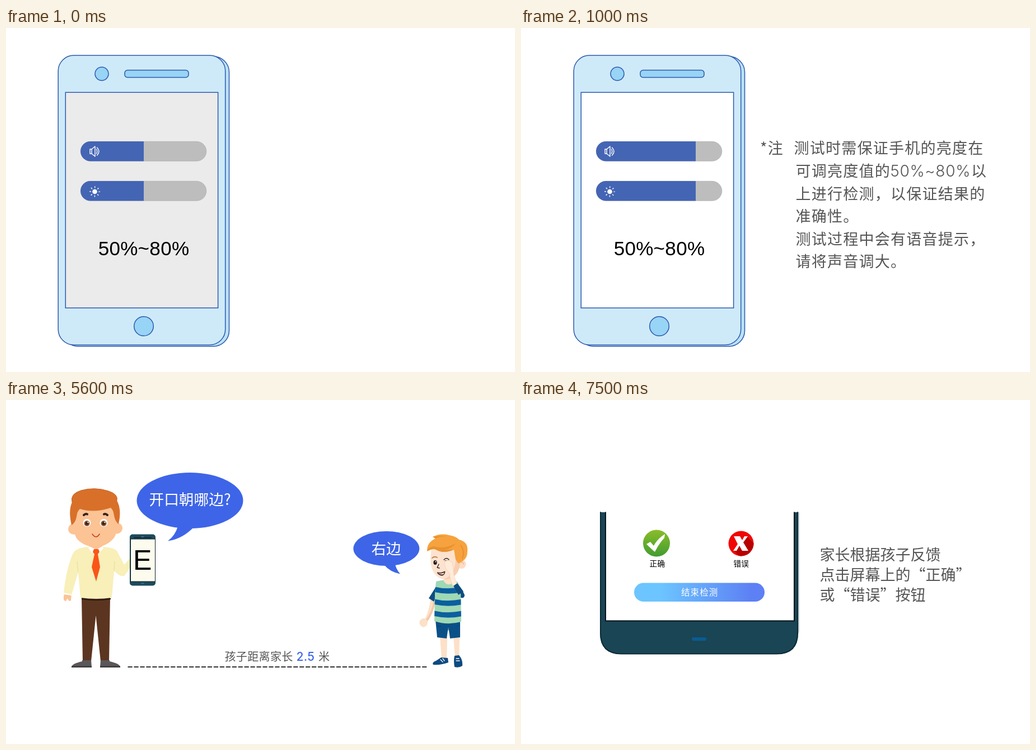
Write an HTML page that moves like this. It is 909 by 616 pixels and loops after 9600 ms.

```html
<!DOCTYPE html>
<html lang="zh-CN">
<head>
<meta charset="utf-8">
<title>视力检测说明</title>
<style>
  html, body { margin: 0; width: 100%; height: 100%; overflow: hidden; background: #fff; }
  svg { display: block; width: 100%; height: 100%; }
  text { font: 300 27px "Noto Sans CJK SC", "Noto Sans CJK", sans-serif; fill: #555; white-space: pre; }
  .latin { font-family: "Liberation Sans", Arial, sans-serif; font-weight: 400; fill: #000; }
  .note text { letter-spacing: 1.25px; }
  .note .digits { font: 300 28px Inter, sans-serif; letter-spacing: .7px; }
  .title text { font-size: 35px; letter-spacing: .5px; }
  .small text, text.small { font-size: 20px; letter-spacing: .35px; }
  .small .distance { font: 500 21px Inter, sans-serif; fill: #3e65e8; }
  .answer { font-size: 13.7px; font-weight: 500; fill: #000; }
  text.white { fill: #fff; }
  .outline { stroke: #2d58ae; stroke-width: 1.5; }
  .line { fill: none; stroke-linecap: round; stroke-linejoin: round; }
</style>
</head>
<body>
<svg viewBox="0 0 909 616">
  <defs>
    <linearGradient id="green" x2="0" y2="1"><stop stop-color="#8abd28"/><stop offset="1" stop-color="#429c32"/></linearGradient>
    <linearGradient id="button"><stop offset=".2" stop-color="#6cc5ff"/><stop offset=".9" stop-color="#5d80f4"/></linearGradient>
    <clipPath id="shirt"><path d="M768 325Q788 319 807 326L812 340L813 397Q789 404 765 396L766 345Z"/></clipPath>
    <clipPath id="red"><circle cx="393" cy="257" r="22.5"/></clipPath>
  </defs>

  <!-- Brightness and volume -->
  <g data-on="0 2500">
    <g id="device">
      <g class="outline">
        <rect x="101" y="51" width="297.5" height="519" rx="28" fill="#b9e2f7"/>
        <rect x="93.2" y="49" width="298.5" height="518.5" rx="28" fill="#ceeaf9"/>
        <rect id="screen" x="106.3" y="115.3" width="272.3" height="386"/>
        <g fill="#97d4f5">
          <circle cx="171" cy="82" r="12"/>
          <rect x="212" y="75.5" width="114" height="13" rx="5"/>
          <circle cx="246" cy="534" r="17.3"/>
        </g>
      </g>
      <g fill="#bdbdbd" stroke="#adadad" stroke-width=".7">
        <rect x="133.3" y="203.3" width="224.5" height="35" rx="17.5"/>
        <rect x="133.3" y="274.3" width="224.5" height="35" rx="17.5"/>
      </g>
      <g fill="#4465b4">
        <path class="level" transform="translate(133 203)"/>
        <path class="level" transform="translate(133 274)"/>
      </g>
      <text class="latin" x="246" y="407" text-anchor="middle" style="font-size:35px;letter-spacing:.3px">50%~80%</text>
    </g>
    <g class="line" stroke="#fff" stroke-width="1.4">
      <path d="M150 217H153L159 212V230L153 225H150ZM153 217V225M161.500 217Q164 221 161.500 225M162.500 214Q169.500 221 162.500 228"/>
      <circle cx="158.500" cy="293" r="3.6" fill="#fff"/>
      <circle cx="158.500" cy="293" r="8" stroke-width="3" stroke-linecap="butt" stroke-dasharray="1.4 4.883" stroke-dashoffset=".7"/>
    </g>
  </g>
  <g class="note" data-on="200 2500">
    <text x="427" y="225">*注</text>
    <text x="487.5" y="225">测试时需保证手机的亮度在</text>
    <text x="490.5" y="266">可调亮度值的</text>
    <text class="digits" x="659.5" y="266">50%~80%</text>
    <text x="804" y="266">以</text>
    <text x="490.5" y="306.500">上进行检测，以保证结果的</text>
    <text x="490.5" y="346.500">准确性。</text>
    <text x="490.5" y="387.500">测试过程中会有语音提示，</text>
    <text x="490.5" y="428">请将声音调大。</text>
  </g>

  <!-- Parent and child -->
  <g data-on="2500 7100">
    <g id="parent">
      <path fill="#fcc394" d="M104 346H117L116 359Q112 362 110 355L107 360Q102 360 103 352ZM148 252H172V268L161 275L148 268Z"/>
      <path fill="#5c3520" d="M135 353H186L184 468H169L160.500 386L152 468H137Z"/>
      <path fill="#5b5758" d="M117 478Q118 472 136 468V466H152L153 478ZM204 478Q203 472 185 468V466H169L168 478Z"/>
      <path fill="#3e3b3c" d="M117 476.500H153V479H117ZM168 476.500H204V479H168Z"/>
      <path class="line" stroke="#2b1a14" stroke-width="2.5" d="M136 356Q161 360 186 356"/>
      <path fill="#f8efb9" d="M148 263Q124 264 119 276Q107 305 103 346L117 349L129 308L133 354Q161 358 189 354L193 306Q203 317 211 315Q216 310 223 297V282L211 295L199 272Q195 264 173 263L161 270Z"/>
      <path class="line" stroke="#e6dc9e" d="M129 308L127 289M193 306L194 289"/>
      <path fill="#fff" d="M103 345L117 348V350L103 348ZM149 262L161 268L154 274L147 265ZM172 262L161 268L167 274L174 265Z"/>
      <path fill="#fa5519" d="M157 267H165L167 272L164 276L168 299L161 325L153 299L158 276L155 272Z"/>
      <g fill="#fcc394">
        <circle cx="121" cy="231" r="10"/><circle cx="198" cy="229.500" r="10"/>
        <path d="M120 192H199Q204 232 192 248Q179 263 160 263Q140 263 127 249Q116 232 120 192Z"/>
      </g>
      <path fill="#d8702a" d="M117 224Q111 198 118 183Q114 168 134 162Q158 155 183 163Q201 169 198 180Q207 196 201 222Q195 218 193 207Q192 197 187 193Q157 203 132 195Q127 199 126 209Q124 220 117 224Z"/>
      <path class="line" stroke="#c9611f" d="M118 183Q114 168 134 162Q158 155 183 163Q201 169 198 180"/>
      <path class="line" stroke="#34231e" stroke-width="4" d="M139 206Q142 203 145 204.500M175 204.500Q178 203 181 206"/>
      <g fill="#fff"><circle cx="144.500" cy="220" r="7"/><circle cx="174.500" cy="220" r="7"/></g>
      <g fill="#8b5637"><circle cx="144.500" cy="221" r="5"/><circle cx="174.500" cy="221" r="5"/></g>
      <g fill="#38211b"><circle cx="144.500" cy="221" r="2.800"/><circle cx="174.500" cy="221" r="2.800"/></g>
      <g fill="#fff"><circle cx="146.500" cy="219" r="1.200"/><circle cx="176.500" cy="219" r="1.200"/></g>
      <path class="line" stroke="#c83a20" stroke-width="1.500" d="M154 240Q161 250 167 240"/>
      <rect x="221" y="240.500" width="46" height="92" rx="5" fill="#1d4a5c"/>
      <rect x="222.500" y="249" width="44" height="76" fill="#fdfbee" stroke="#0b222d"/>
      <path class="line" stroke="#0b222d" stroke-width="1.500" d="M229 246.500H259"/>
      <path class="line" stroke="#477a8e" stroke-width="1.500" d="M242 245H246M242 328.500H246"/>
      <text class="latin" x="227" y="303.500" style="font-size:50px">E</text>
    </g>

    <g id="child">
      <path fill="#fde0c8" d="M775 424H788L787 464H778ZM799 424H810L809 461H802Z"/>
      <path fill="#0e4a80" d="M777 461L789 462L790 470Q777 475 763 474Q760 470 768 467ZM801 458L809 457Q816 465 815 476Q809 480 801 478Q799 467 801 458Z"/>
      <path class="line" stroke="#fff" stroke-width="1.300" d="M776 465L780 469M780 463L783 467M804 463H809M804 467H810"/>
      <path fill="#fde0c8" d="M758 357L767 360Q763 382 753 396Q754 405 745 407Q736 403 739 395Q744 390 749 391Q756 375 758 357Z"/>
      <path fill="#f4c8ab" d="M763 361L767 361Q763 382 753 396L750 393Q761 378 763 361Z"/>
      <path fill="#0a5087" d="M767 394H811V425L793 427L790 406L787 427L770 425Z"/>
      <path class="line" stroke="#07406f" d="M770 404Q773 407 777 405M805 405L810 403M790 404V412"/>
      <path fill="#0c4d82" d="M768 334L755 355L764 361L768 352ZM803 326Q813 335 819 349Q819 356 812 354L801 344Z"/>
      <path fill="#fde0c8" d="M782 314H799L798 327Q790 334 782 326Z"/>
      <g clip-path="url(#shirt)">
        <path fill="#9fd8b4" d="M760 320H820V405H760Z"/>
        <path fill="none" stroke="#0b5f9f" stroke-width="9.500" d="M760 338Q789 346 820 338M760 360Q789 368 820 360M760 381Q789 389 820 381"/>
      </g>
      <path fill="#fde0c8" d="M782 318H799V326Q790 335 782 325Z"/>
      <circle cx="813.500" cy="294" r="8" fill="#fddcc3"/>
      <path class="line" stroke="#dda985" d="M812 291Q817 289 817 294"/>
      <path fill="#fde3cf" d="M760 266L809 262Q814 286 808 306Q798 324 780 321Q763 316 759 296Q757 280 760 266Z"/>
      <path fill="#f8cfb2" d="M809 280Q813 296 807 307Q797 324 781 321Q800 315 803 288Z"/>
      <path fill="#f6a23e" d="M752 271Q751 255 767 248L762 245Q776 238 791 242Q804 244 809 250Q826 254 824 271Q824 283 816 288L808 293L803 286L800 268Q781 276 768 268Q762 265 752 271Z"/>
      <path fill="#e8922f" d="M752 271Q754 263 764 262Q782 268 803 257Q796 267 781 268L800 268Q781 276 768 268Q762 265 752 271ZM762 245Q776 242 788 245Q775 244 767 248Z"/>
      <path class="line" stroke="#df842a" stroke-width="1.200" d="M812 260Q820 270 815 284"/>
      <path class="line" stroke="#b36d32" stroke-width="1.500" d="M761 283Q765 279 770 282"/>
      <ellipse cx="766.500" cy="291" rx="3.200" ry="4" fill="#251b1a"/>
      <circle cx="767.300" cy="289.500" r="1" fill="#fff"/>
      <path class="line" stroke="#251b1a" stroke-width="1.300" d="M782 286Q787 281 791 286M784 288H789M773 294L770 300L774 301"/>
      <path fill="#712d27" stroke="#251b1a" d="M770 309Q777 311 784 307Q783 315 777 314Q772 313 770 309Z"/>
      <path fill="#fff" d="M772 310Q777 312 783 309L781 312Q776 313 772 310Z"/>
      <path fill="#ffebd9" stroke="#f3cdaf" stroke-width=".7" d="M783 289Q790 285 797 291L799 302Q799 317 806 330L799 335Q793 324 792 310Q786 304 784 299Z"/>
      <path fill="#0c4d82" d="M799 333L806 328L817 343L808 349Z"/>
    </g>
  </g>

  <g data-on="2700 5600">
    <g class="title">
      <text x="314" y="202">孩子遮住左眼，测试右眼</text>
      <text x="312" y="248">家长点击</text>
      <text x="636" y="248">按钮</text>
    </g>
    <rect x="463" y="212" width="164" height="44.500" rx="22.250" fill="#3e65e8"/>
    <text class="white" x="480.500" y="247" style="font-size:32px">开始测试</text>
    <path d="M277 291.500H746" stroke="#999" stroke-width="1.400" stroke-dasharray="7.800 2.680"/>
    <text class="small" x="402.500" y="323">手机与眼睛保持水平</text>
  </g>
  <g class="small" data-on="2700 7100">
    <text x="390.500" y="467">孩子距离家长</text>
    <text class="distance" x="518.500" y="467">2.5</text>
    <text x="558" y="467">米</text>
    <path d="M217.500 478H751.500" stroke="#333" stroke-width="2" stroke-dasharray="8.200 2.750"/>
  </g>
  <g data-on="5600 7100">
    <g fill="#3e65e8">
      <ellipse cx="328.500" cy="180" rx="95" ry="50"/>
      <path d="M307 226Q302 243 289 252.500Q315 249 336 227Z"/>
      <ellipse cx="679.300" cy="266" rx="59" ry="31"/>
      <path d="M675 295Q686 308 704 311.500Q696 302 695 293Z"/>
    </g>
    <text class="white" x="255.500" y="187.500" style="font-size:26.700px">开口朝哪边?</text>
    <text class="white" x="652.500" y="276" style="font-size:26.500px">右边</text>
  </g>

  <!-- Answer buttons -->
  <g data-on="7100 9600">
    <path fill="#b9c6cb" d="M494 201H497V414L494 422Z"/>
    <path fill="#1a4555" d="M141 201H495V417Q495 455 457 455H179Q141 455 141 417Z"/>
    <path class="line" stroke="#0c2b37" stroke-width="2" stroke-linecap="butt" d="M142 201V417Q142 454.500 179 454.500H457Q494 454.500 494 417V201"/>
    <path fill="#fff" d="M151 200H488V395.500H151Z"/>
    <path fill="none" stroke="#06141b" stroke-width="2" d="M151 200.500V395.500H488V200.500"/>
    <rect x="305" y="425" width="26" height="6" rx="2.500" fill="#095c92"/>
    <circle cx="242" cy="256.500" r="24" fill="url(#green)"/>
    <path fill="#fff" d="M224 258L231 254L237 261Q244 248 257 240L256 247Q247 256 239 272Q234 268 224 258Z"/>
    <g clip-path="url(#red)">
      <path fill="#f20505" d="M370 234H416V280H370Z"/>
      <path fill="#b80000" d="M402 243L420 261V285H394L381 270Z"/>
    </g>
    <path fill="#fff" d="M380 244H391L395 251L399 244H405L397 255L406 270H395L390 261L385 270H379L387 258Z"/>
    <text class="answer" x="229.500" y="298">正确</text>
    <text class="answer" x="379.500" y="298">错误</text>
    <rect x="202" y="327.500" width="233" height="33.500" rx="16.750" fill="url(#button)"/>
    <text class="white" x="286" y="350" style="font-size:15.500px;letter-spacing:1.100px">结束检测</text>
  </g>
  <g data-on="7500 9600">
    <text x="533.500" y="287">家长根据孩子反馈</text>
    <text x="533.500" y="323">点击屏幕上的“正确”</text>
    <text x="533.500" y="359">或“错误”按钮</text>
  </g>
</svg>
<script>
  const LOOP = 9600;
  const parts = [...document.querySelectorAll('[data-on]')].map(node => {
    const [from, to] = node.dataset.on.split(' ').map(Number);
    return { node, from, to };
  });
  const device = document.getElementById('device');
  const display = document.getElementById('screen');
  const levels = document.querySelectorAll('.level');
  const start = performance.now();

  function draw() {
    const t = (performance.now() - start) % LOOP;
    for (const { node, from, to } of parts) {
      node.style.display = t >= from && t < to ? '' : 'none';
    }
    const bright = t >= 1000;
    device.setAttribute('transform', `translate(${bright ? 1 : 0} 0)`);
    display.setAttribute('fill', bright ? '#fff' : '#ebebeb');
    for (const level of levels) {
      level.setAttribute('d', `M17.8 0H${bright ? 178 : 113}V35.5H17.8A17.75 17.75 0 0 1 17.8 0Z`);
    }
    requestAnimationFrame(draw);
  }
  draw();
</script>
</body>
</html>
```
